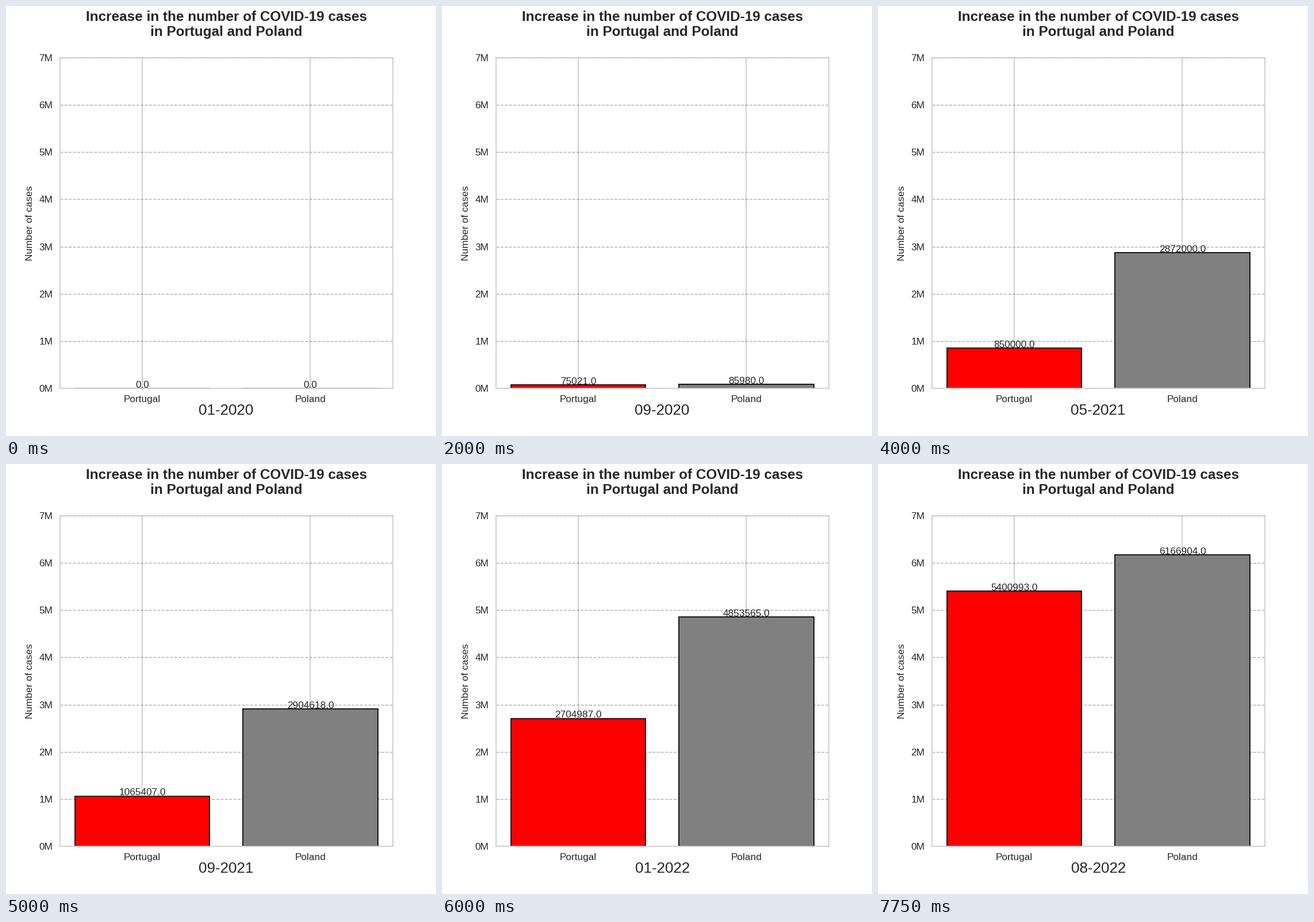
A matplotlib script for the animation above (8 s loop, 748x748 px).

```python
import matplotlib.pyplot as plt
import numpy as np
from matplotlib.animation import FuncAnimation

SIZE = 748
INCHES = 6
INK = "#262626"
LIGHT = "#cccccc"
MILLION = 1_000_000
MONTHS = 32

# Turning points of the waves: months since January 2020 -> cumulative cases
PORTUGAL = {0: 0, 8: 75021, 11: 406000, 12: 685673, 13: 804000, 16: 850000,
            20: 1065407, 23: 1330000, 24: 2704987, 27: 3960314, 29: 5150000,
            31: 5400993}
POLAND = {0: 0, 8: 85980, 9: 341000, 10: 985000, 12: 1515547, 15: 2785000,
          16: 2872000, 20: 2904618, 21: 3010000, 24: 4853565, 25: 5670000,
          27: 5990718, 29: 6016000, 31: 6166904}

plt.rcParams.update({
    "font.family": "Liberation Sans",
    "text.color": INK,
    "xtick.labelcolor": INK,
    "ytick.labelcolor": INK,
})


def monthly(waves):
    """Whole case counts for every month along the turning points."""
    return np.interp(range(MONTHS), list(waves), list(waves.values())).round()


def label(x, y, text, size, **style):
    """Place text by its baseline, in pixels from the top left."""
    return fig.text(x / SIZE, 1 - y / SIZE, text, fontsize=size,
                    ha="center", va="baseline", **style)


fig = plt.figure(figsize=(INCHES, INCHES), dpi=SIZE / INCHES, facecolor="white")
left, right, top, bottom = 93.5, 672.86, 89.7, 665.35
ax = fig.add_axes([left / SIZE, 1 - bottom / SIZE,
                   (right - left) / SIZE, (bottom - top) / SIZE])

ax.set_xlim(-0.49, 1.49)
ax.set_ylim(0, 7 * MILLION)
ax.set_xticks([0, 1], ["Portugal", "Poland"])
ax.set_yticks([n * MILLION for n in range(8)], [f"{n}M" for n in range(8)])
ax.tick_params(length=0, pad=7, labelsize=10)
ax.set_axisbelow(True)
ax.grid(axis="x", color=LIGHT, linewidth=1)
ax.grid(axis="y", color="black", alpha=0.32, linestyle="--", linewidth=0.8)
for spine in ax.spines.values():
    spine.set(color=LIGHT, linewidth=1)

center = (left + right) / 2
label(center, 25.8, "Increase in the number of COVID-19 cases", 14, weight="bold")
label(center, 52, "in Portugal and Poland", 14, weight="bold")
label(46.4, 378, "Number of cases", 10, rotation=90, rotation_mode="anchor")
date = label(center, 711.2, "", 15)

series = [monthly(PORTUGAL), monthly(POLAND)]
bars = ax.bar([0, 1], [0, 0], width=0.8, color=["red", "gray"],
              edgecolor="black", linewidth=1)
counts = [
    ax.annotate("", (x, 0), xytext=(0, 0.9), textcoords="offset points",
                fontsize=10, ha="center", va="baseline")
    for x in (0, 1)
]


def update(month):
    for x, (bar, count, cases) in enumerate(zip(bars, counts, series)):
        bar.set_height(cases[month])
        count.xy = (x, cases[month])
        count.set_text(f"{cases[month]:.1f}")
    date.set_text(f"{month % 12 + 1:02d}-{2020 + month // 12}")
    return [*bars, *counts, date]


anim = FuncAnimation(fig, update, frames=MONTHS, init_func=lambda: update(0),
                     interval=250, repeat=True, repeat_delay=0, blit=False)
plt.show()
```
